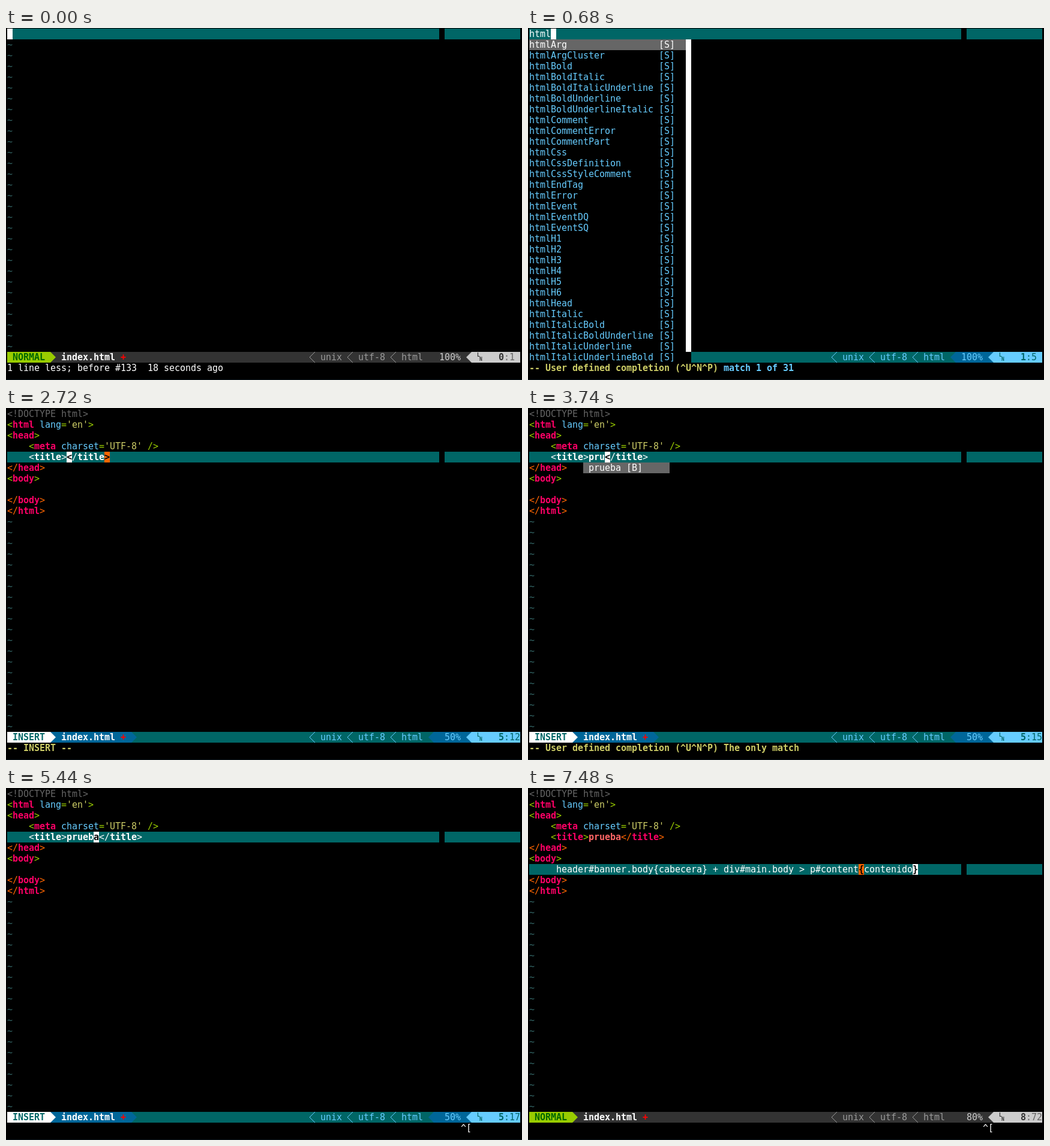
Recreate the animation shown at these times as an HTML page with a canvas. Size 860 px wide and 588 px high, loop 8 s.

```html
<!DOCTYPE html>
<html lang="en">
<head>
<meta charset="utf-8">
<title>Editor session</title>
<style>
html, body { margin: 0; height: 100%; overflow: hidden; background: #000; }
canvas { display: block; }
</style>
</head>
<body>
<canvas width="860" height="588"></canvas>
<script>
const ctx = document.querySelector('canvas').getContext('2d');
const LOOP = 8000, CELL_W = 9, CELL_H = 18, COLS = 95, STATUS = 30;
const C = {
  teal: '#006666', blue: '#006699', sky: '#66ccff', gray: '#666666', dark: '#333333',
  light: '#cccccc', dim: '#999999', lime: '#99cc00', orange: '#ff6600', pink: '#ff0066',
  rose: '#ff6666', sand: '#cccc66', white: '#ffffff', black: '#000000', red: '#ff0000'
};

const SYNTAX = ('Arg ArgCluster Bold BoldItalic BoldItalicUnderline BoldUnderline BoldUnderlineItalic ' +
  'Comment CommentError CommentPart Css CssDefinition CssStyleComment EndTag Error Event EventDQ EventSQ ' +
  'H1 H2 H3 H4 H5 H6 Head Italic ItalicBold ItalicBoldUnderline ItalicUnderline ItalicUnderlineBold').split(' ');
const ABBREVIATION = '     header#banner.body{cabecera} + div#main.body > p#content{contenido}';
const page = title => ['<!DOCTYPE html>', "<html lang='en'>", '<head>', "    <meta charset='UTF-8' />",
  `    <title>${title}</title>`, '</head>', '<body>', '', '</body>', '</html>'];
const complete = '-- User defined completion (^U^N^P) ';
const only = complete + 'The only match';
const pruebaMenu = { row: 5, col: 10, width: 16, text: ' prueba [B]' };

// Each step changes only the listed fields of the step before it.
const steps = [
  { at: 0, normal: true, lines: [''], row: 0, col: 0, under: '', match: null, menu: null, list: false,
    cmd: '1 line less; before #133  18 seconds ago', keys: '', pos: '0:1', pct: '100%' },
  { at: 340, normal: false, cmd: '-- INSERT --' },
  { at: 680, lines: ['html'], col: 4, list: true, cmd: complete + '|match 1 of 31', pos: '1:5' },
  { at: 1360, lines: ['html:'], col: 5, list: false, cmd: only, pos: '1:6',
    menu: { row: 1, col: 0, width: 15, text: 'html:5 [B]' } },
  { at: 1700, lines: ['html:5'], col: 6 },
  { at: 2720, lines: page(''), row: 4, col: 11, under: '<', match: [18, '>'], menu: null,
    cmd: '-- INSERT --', pos: '5:12', pct: '50%' },
  { at: 3740, lines: page('pru'), col: 14, match: null, menu: pruebaMenu, cmd: only, pos: '5:15' },
  { at: 4080, lines: page('prueba'), col: 17, match: [24, '>'], menu: null, cmd: '-- INSERT --', pos: '5:18' },
  { at: 4420, lines: page('pruebas'), col: 18, match: [25, '>'], pos: '5:19' },
  { at: 4760, lines: page('prueba'), col: 17, match: null, menu: pruebaMenu, cmd: only, pos: '5:17' },
  { at: 5440, col: 16, under: 'a', menu: null, cmd: '', keys: '^[' },
  { at: 6120, row: 7, col: 1, under: '', cmd: '-- INSERT --', keys: '', pos: '8:2', pct: '80%' },
  { at: 6800, col: 0, cmd: '', keys: '^[' },
  { at: 7140, normal: true, lines: page('prueba').with(7, ABBREVIATION), col: 71, under: '}',
    match: [61, '{'], keys: '', pos: '8:72' },
  { at: 7480, keys: '^[' }
];
steps.forEach((step, i) => { steps[i] = { ...steps[i - 1], ...step }; });

const x = col => 2 + col * CELL_W;
const y = row => 1 + row * CELL_H;

function fill(row, col, width, color, height = 1) {
  ctx.fillStyle = color;
  ctx.fillRect(x(col), y(row), width * CELL_W, height * CELL_H);
}

function put(row, col, text, color, bold) {
  ctx.font = `${bold ? 'bold ' : ''}15px "DejaVu Sans Mono", monospace`;
  ctx.fillStyle = color;
  [...text].forEach((ch, i) => ctx.fillText(ch, x(col + i), y(row) + 14));
}

// Powerline separator in one status cell; dir is 1 for right, -1 for left.
function arrow(col, dir, color, outline) {
  const base = x(dir > 0 ? col : col + 1), top = y(STATUS);
  ctx.beginPath();
  ctx.moveTo(base, top);
  ctx.lineTo(base + dir * CELL_W, top + CELL_H / 2);
  ctx.lineTo(base, top + CELL_H);
  ctx.fillStyle = ctx.strokeStyle = color;
  if (outline) ctx.stroke(); else ctx.fill();
}

function drawMarkup(row, line, active) {
  if (line.startsWith('<!')) return put(row, 0, line, C.gray);
  let inside = false, closing = false, previous = '';
  for (const { 0: token, index } of line.matchAll(/<\/?|\/?>|'.*?'|[\w-]+|./g)) {
    let color = C.lime, bold = false;
    if (token[0] === '<') {
      inside = true;
      closing = token === '</';
    }
    if (/^\w/.test(token)) {
      const tag = previous[0] === '<';
      bold = tag || !inside;
      color = tag ? C.pink : inside ? C.sky : C.rose;
    } else if (token[0] === "'") color = C.sand;
    else if (closing) color = C.orange;
    if (token.endsWith('>')) inside = false;
    put(row, index, token, active ? C.white : color, bold);
    previous = token;
  }
}

function drawBuffer(s) {
  for (let row = s.lines.length; row < STATUS; row++) put(row, 0, '~', '#336666');
  fill(s.row, 0, COLS, C.teal);
  fill(s.row, 80, 1, C.black);
  s.lines.forEach((line, row) => {
    if (/^\s*</.test(line)) drawMarkup(row, line, row === s.row);
    else put(row, 0, line, C.white);
  });
  if (s.match) {
    fill(s.row, s.match[0], 1, C.orange);
    put(s.row, s.match[0], s.match[1], C.black, true);
  }
  fill(s.row, s.col, 1, C.white);
  put(s.row, s.col, s.under, C.black, true);
}

function drawStatus({ normal, pos, pct }) {
  const bar = normal ? C.dark : C.teal;
  const mode = normal ? C.lime : C.white;
  const info = normal ? C.dim : C.sky;
  const end = normal ? C.light : C.sky;
  const ink = normal ? C.dark : C.teal;
  fill(STATUS, 0, COLS, bar);
  if (!normal) {
    fill(STATUS, 8, 15, C.blue);
    arrow(23, 1, C.blue);
    arrow(78, -1, C.blue);
    fill(STATUS, 79, 7, C.blue);
  }
  fill(STATUS, 0, 8, mode);
  arrow(8, 1, mode);
  put(STATUS, 1, normal ? 'NORMAL' : 'INSERT', normal ? '#006600' : C.teal, true);
  put(STATUS, 10, 'index.html', C.white, true);
  put(STATUS, 21, '+', C.red, true);
  [[56, 'unix'], [63, 'utf-8'], [71, 'html']].forEach(([col, label]) => {
    arrow(col, -1, info, true);
    put(STATUS, col + 2, label, info);
  });
  put(STATUS, 80, pct.padStart(4), normal ? C.light : C.sky);
  arrow(85, -1, end);
  fill(STATUS, 86, 9, end);
  ctx.fillStyle = ink;
  ctx.font = 'bold 8px "DejaVu Sans Mono", monospace';
  ctx.fillText('L', x(87), y(STATUS) + 8);
  ctx.fillText('N', x(87) + 4, y(STATUS) + 15);
  put(STATUS, 91, pos[0], ink, true);
  put(STATUS, 92, pos.slice(1), normal ? C.gray : C.teal);
}

function drawList() {
  fill(1, 0, 30, C.black, 30);
  fill(1, 0, 29, C.gray);
  fill(1, 29, 1, C.white, 29);
  SYNTAX.forEach((name, i) => {
    const color = i ? C.sky : C.white;
    put(i + 1, 0, 'html' + name, color);
    put(i + 1, 24, '[S]', color);
  });
}

function draw(s) {
  fill(0, 0, COLS, C.black);
  ctx.fillRect(0, 0, 860, 588);
  ctx.fillStyle = '#0a141c';
  ctx.fillRect(0, 587, 860, 1);
  drawBuffer(s);
  drawStatus(s);
  if (s.list) drawList();
  if (s.menu) {
    fill(s.menu.row, s.menu.col, s.menu.width, C.gray);
    put(s.menu.row, s.menu.col, s.menu.text, C.white);
  }
  const [message, count = ''] = s.cmd.split('|');
  const modeLine = message.startsWith('--');
  put(31, 0, message, modeLine ? C.sand : C.white, modeLine);
  put(31, message.length, count, C.sky, true);
  put(31, 84, s.keys, C.white);
}

function tick() {
  const t = performance.now() % LOOP;
  draw(steps.findLast(step => step.at <= t));
  requestAnimationFrame(tick);
}
tick();
</script>
</body>
</html>
```
